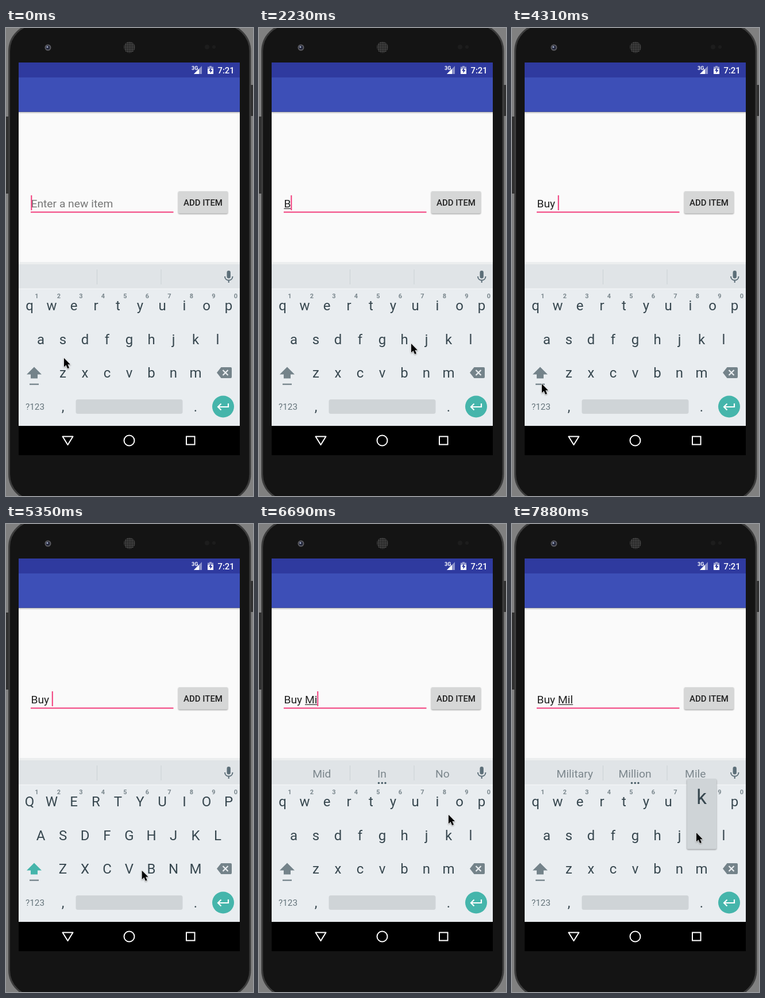
An HTML page for the animation above (8000 ms loop, 430 px wide and 814 px high).

```html
<!DOCTYPE html>
<html>
<head>
<meta charset="utf-8">
<style>
  html, body { margin: 0; height: 100%; overflow: hidden; background: #808080; }
  svg { display: block; font-family: Roboto, "Noto Sans", sans-serif; }
  text { white-space: pre; }
  .mid { text-anchor: middle; }
  .key { font-size: 24px; fill: #37474f; }
  .num { font-size: 11px; font-weight: 700; fill: #7b888e; }
  .entry { font-size: 19.25px; }
  .lift { filter: drop-shadow(0 1px 1px #0006); }
</style>
</head>
<body>
<svg width="430" height="814" viewBox="0 0 430 814">
  <defs>
    <pattern id="mesh" width="3" height="3" patternUnits="userSpaceOnUse">
      <rect width="3" height="3" fill="#1c1c1c"/><circle cx="1.5" cy="1.5" r="1" fill="#626262"/>
    </pattern>
    <linearGradient id="shade" x2="0" y2="1">
      <stop stop-color="#000" stop-opacity=".28"/><stop offset="1" stop-color="#000" stop-opacity="0"/>
    </linearGradient>
  </defs>

  <!-- phone -->
  <rect width="430" height="814" fill="#808080"/>
  <rect x="-4" y="154" width="11" height="134" rx="2" fill="#303030"/>
  <rect x="423" y="99" width="11" height="54" rx="2" fill="#303030"/>
  <rect x="5.5" y="-6" width="419.500" height="828" rx="46" fill="#141414" stroke="#3c3c3c" stroke-width="3"/>
  <circle cx="73" cy="34" r="5.500" fill="#5b5b60"/><circle cx="73" cy="34" r="3.500" fill="#22263a"/>
  <circle cx="72" cy="33" r="1.500" fill="#a9b4d0"/>
  <circle cx="215" cy="33.500" r="9.800" fill="url(#mesh)"/>
  <circle cx="350" cy="33" r="4" fill="#1d1d1d"/><circle cx="362" cy="33" r="3" fill="#1d1d1d"/>

  <!-- bars and content -->
  <rect x="22" y="60" width="385" height="683" fill="#fafafa"/>
  <rect x="22" y="60" width="385" height="86" fill="#3d4fb7"/>
  <rect x="22" y="60" width="385" height="26" fill="#2f3a9f"/>
  <rect x="22" y="145.500" width="385" height="4" fill="url(#shade)"/>
  <g fill="#fff">
    <text x="323" y="73" font-size="9" font-weight="700">3G</text>
    <path d="M341 66V80H327Z" opacity=".45"/><path d="M336 71V80H327Z"/>
    <path d="M354 66h4v1.500h3V80H351V67.500h3Z" opacity=".5"/>
    <path d="M351 71h10v9H351Z"/>
    <path d="M357 69l-4 5.500h2.500V78.500l4-5.500H357Z" fill="#2f3a9f"/>
    <text x="368.500" y="78.500" font-size="14.800" font-weight="500">7:21</text>
  </g>
  <rect x="300" y="284" width="86" height="38.500" rx="2" fill="#d6d7d7" class="lift"/>
  <text x="343" y="308.700" font-size="14.970" font-weight="500" fill="#212121" class="mid">ADD ITEM</text>
  <rect x="43" y="319.300" width="248.500" height="2" fill="#f23d7c"/>
  <text id="entry" class="entry" x="43.500" y="311.500"></text>
  <rect id="mark" y="313.500"/>
  <rect id="caret" y="291" width="2" height="26" fill="#f23d7c"/>

  <!-- keyboard -->
  <rect x="22" y="407" width="385" height="5" fill="#eceeef"/>
  <rect x="22" y="411" width="385" height="282" fill="#e9edf0"/>
  <rect x="22" y="411" width="385" height="42" fill="#e0e4e7"/>
  <rect x="22" y="453" width="385" height="1.500" fill="#f1f4f6"/>
  <path d="M158.500 420V446M270 420V446" stroke="#cbd1d5"/>
  <g id="tips" class="entry mid"></g>
  <g id="dots" fill="#455a64"><circle cx="208.500" cy="450.500" r="1.700"/><circle cx="214.300" cy="450.500" r="1.700"/><circle cx="220" cy="450.500" r="1.700"/></g>
  <g fill="none" stroke="#5d6f79" stroke-width="2">
    <rect x="385.700" y="423.200" width="4" height="11" rx="2" fill="#5d6f79" stroke-width="2.400"/>
    <path d="M381 432c0 9 13.500 9 13.500 0M387.700 439V443"/>
  </g>
  <g id="keys" class="mid"></g>
  <g id="shift"><path d="M49 589.500L62 602.500H55V609.500H43V602.500H36Z"/></g>
  <rect x="41" y="618.500" width="16" height="2.300" fill="#74838a"/>
  <path d="M374.500 590H391q2 0 2 2V607q0 2-2 2H374.500L367 599.500Z" fill="#74838a"/>
  <path d="M377.500 595l9 9m0-9l-9 9" stroke="#e9edf0" stroke-width="2.200"/>
  <text x="34" y="664" font-size="15.300" fill="#65747b">?123</text>
  <rect id="space" x="121.500" y="646" width="186" height="25" rx="3.500"/>
  <circle cx="378" cy="658.500" r="19" fill="#45b5ab"/>
  <path d="M387 653V659H370M374.500 653.500L369 659L374.500 664.500" fill="none" stroke="#fff" stroke-width="2.200"/>

  <!-- navigation bar -->
  <rect x="22" y="692" width="385" height="51"/>
  <g fill="none" stroke="#fff" stroke-width="2">
    <path d="M98.500 710.500H116.500L107.500 725Z" stroke-linejoin="round"/>
    <circle cx="214.500" cy="717.500" r="9"/><rect x="314" y="710.500" width="14.500" height="14"/>
  </g>

  <g id="popup" class="mid">
    <rect x="-25.500" y="-106" width="51.500" height="122" rx="2" fill="#cfd4d7" class="lift"/>
    <text y="-62.500" font-size="35" fill="#37474f"></text>
  </g>
  <path id="mouse" class="lift" d="M0 0V15.500L3.600 12.200L6.200 18.200L9 17L6.400 11.200H11Z" stroke="#fff" stroke-width="1.200" paint-order="stroke"/>
</svg>

<script>
const LOOP = 8000, STEP = 148.6, LEFT = 43.5;
const $ = id => document.getElementById(id);
const set = (el, attrs) => { for (const k in attrs) el.setAttribute(k, attrs[k]); };

// step, finished text, word being typed, suggestions
const typed = [
  [-2.3, '', '', ''],
  [15, '', 'B', ''],
  [18, '', 'Bu', 'But By Built'],
  [22, '', 'Buy', 'But Buy Guy'],
  [27, 'Buy ', '', ''],
  [41, 'Buy ', 'M', 'More Me Most'],
  [43, 'Buy ', 'Mi', 'Mid In No'],
  [50, 'Buy ', 'Mil', 'Military Million Mile']
];
const pressed = { 14: 'B', 17: 'u', 21: 'y', 40: 'M', 42: 'i', 48: 'l', 49: 'l', 53: 'k' };
// step, x, y
const path = [
  [0, 101, 574], [2, 101, 574], [4, 75, 590], [5, 41, 600], [6, 48, 600], [8, 178, 590],
  [9, 178, 590], [10, 215, 592], [12, 252, 597], [14, 252, 597], [15, 265, 549], [16, 272, 500],
  [18, 272, 486], [20, 242, 482], [22, 238, 484], [24, 225, 610], [25, 222, 650], [26, 222, 650],
  [29, 52, 619], [30, 30, 604], [31, 42, 600], [32, 42, 600], [34, 110, 600], [37, 300, 604],
  [38, 320, 604], [40, 320, 604], [41, 316, 492], [43, 312, 487], [48, 357, 534], [50, 356, 534],
  [51, 321, 537], [54, 321, 537]
];

const spots = {};
let keys = '';
[['qwertyuiop', 41, 491], ['asdfghjkl', 60.5, 549.5], ['zxcvbnm', 99, 608]].forEach(([row, x0, y], r) =>
  [...row].forEach((c, i) => {
    const x = x0 + 38.5 * i;
    spots[c] = [x, y];
    keys += `<text class="key letter" x="${x}" y="${y}">${c}</text>`;
    if (!r) keys += `<text class="num" x="${x + 12.5}" y="470">${(i + 1) % 10}</text>`;
  }));
$('keys').innerHTML = keys + '<text class="key" x="99" y="667">,</text><text class="key" x="330" y="667">.</text>';
const letters = [...document.querySelectorAll('.letter')];

const pen = document.createElement('canvas').getContext('2d');
pen.font = '19.25px Roboto, "Noto Sans", sans-serif';
const width = s => pen.measureText(s).width;

function mouseAt(n) {
  const i = path.findIndex(p => p[0] > n), [a, x, y] = path[i - 1], [b, u, v] = path[i];
  const k = (n - a) / (b - a);
  return `translate(${x + (u - x) * k} ${y + (v - y) * k})`;
}

function draw(n) {
  const [start, done, word, tips] = typed.findLast(e => e[0] <= n);
  const text = done + word, fix = word === 'Bu';
  $('entry').textContent = text || 'Enter a new item';
  set($('entry'), { fill: text ? '#212121' : '#777' });
  set($('mark'), {
    x: LEFT + width(done), width: width(word),
    height: fix ? 2.2 : 1.2, fill: fix ? '#33b5e5' : '#212121'
  });
  const age = (n - start) * STEP + 60;
  set($('caret'), { x: 43.3 + width(text), opacity: age % 1000 < 500 ? 1 : 0 });

  $('tips').innerHTML = tips && tips.split(' ').map((s, i) => {
    const look = fix && i === 1 ? 'fill="#37474f" font-weight="700"' : 'fill="#7b868c"';
    return `<text x="${[109.3, 214, 319.3][i]}" y="440.7" ${look}>${s}</text>`;
  }).join('');
  set($('dots'), { opacity: tips ? 1 : 0 });

  const upper = n >= 10 && n <= 14 || n >= 33 && n <= 40;
  Object.keys(spots).forEach((c, i) => letters[i].textContent = upper ? c.toUpperCase() : c);
  set($('shift'), { fill: upper ? '#45b5ab' : '#74838a' });
  set($('space'), { fill: n === 25 || n === 26 ? '#b6bec2' : '#cfd4d7' });

  const key = pressed[n];
  set($('popup'), { visibility: key ? 'visible' : 'hidden' });
  if (key) {
    set($('popup'), { transform: `translate(${spots[key.toLowerCase()]})` });
    $('popup').querySelector('text').textContent = key;
  }
  set($('mouse'), { transform: mouseAt(n) });
}

const origin = performance.now();
let last = -1;
function tick() {
  const t = (performance.now() - origin) % LOOP;
  const n = Math.min(53, Math.floor((t + 8) / STEP));
  if (n !== last) draw(last = n);
  requestAnimationFrame(tick);
}
tick();
</script>
</body>
</html>
```
